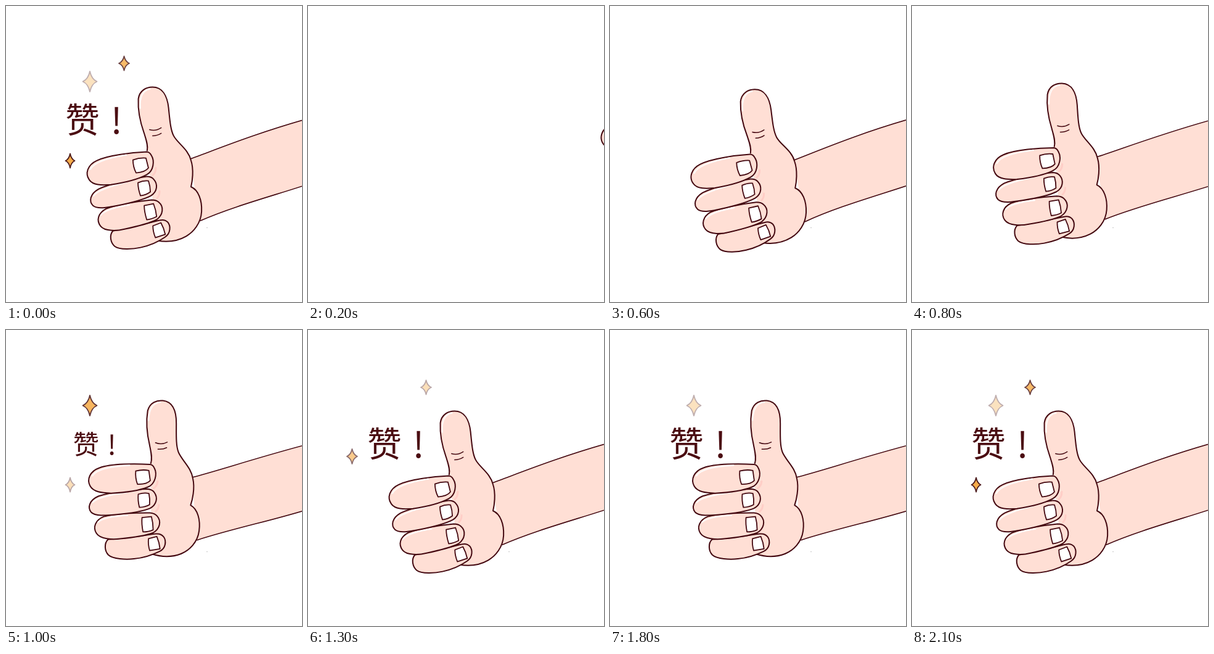
An HTML page for the animation above (2.2 s loop, 480 px wide and 480 px high).

```html
<!DOCTYPE html>
<html lang="zh">
<head>
<meta charset="utf-8">
<style>
  html, body { margin: 0; width: 100%; height: 100%; overflow: hidden; background: #fff; }
  svg { display: block; width: 100vw; height: 100vh; }
  text { font-family: "Noto Sans CJK SC", "Noto Sans CJK", "Noto Sans CJK JP", sans-serif; text-anchor: middle; fill: #4b0d12; }
  .skin { fill: #ffdfd5; stroke: #430810; stroke-width: 2; stroke-linejoin: round; stroke-linecap: round; }
  .arm { stroke-width: 1.6; }
  .nail { fill: #fff; stroke: #430810; stroke-width: 1.8; stroke-linejoin: round; }
  .crease { fill: none; stroke: #430810; stroke-width: 1.5; stroke-linecap: round; }
  .shine { fill: none; stroke: #fff; stroke-width: 2.4; stroke-linecap: round; opacity: .85; }
  .shade { fill: none; stroke: #ffc6c0; stroke-width: 3; stroke-linecap: round; opacity: .7; }
  .spark { fill: #f6ad4b; stroke: #4b1a1c; stroke-width: 1.8; stroke-linejoin: round; }
</style>
</head>
<body>
<svg id="stage" viewBox="0 0 480 480">
  <g id="hand"><circle cx="326" cy="359.5" r=".7" fill="#aaa"/></g>
  <g id="sparks"></g>
  <g id="praise">
    <text x="124" y="205.3" font-size="55.5">赞</text>
    <text x="179" y="207.3" font-size="58">!</text>
  </g>
</svg>
<script>
const LOOP = 2200, STEP = 100;
const PIVOT = { x: 403, y: 281 };
const hand = document.getElementById('hand');
const praise = document.getElementById('praise');
const sparkLayer = document.getElementById('sparks');

function addPath(parent, cls, d) {
  const el = document.createElementNS('http://www.w3.org/2000/svg', 'path');
  el.setAttribute('class', cls);
  el.setAttribute('d', d);
  parent.appendChild(el);
  return el;
}

// Outlines in the resting pose, back to front.
const parts = [
  ['skin arm', 'M298 248 C335 235 405 206 496 181 L496 287 C440 306 370 324 315 348'],
  ['skin', 'M229 234 C231 225 227 215 224 205 C217 185 214 168 215 150 C217 136 228 131 238 131 C254 131 262 145 264 165 C266 185 267 200 272 210 C278 222 296 232 300 250 C305 265 302 285 300 293 C312 298 318 315 317 333 C316 352 304 366 292 373 C278 381 262 383 245 380'],
  ['shine', 'M218 165 C217 148 222 136 234 134'],
  ['crease', 'M233 200 Q243 203 252 197 M238 210 Q246 210 252 206'],
  ['skin', 'M249 347 C235 350 200 360 173 364 C167 371 169 383 176 389 C184 395 205 394 218 391 C232 388 248 381 258 374 C267 368 267 356 262 350 C258 346 253 346 249 347 Z'],
  ['nail', 'M238 356 L251 351 Q256 360 258 370 L242 375 Q238 366 238 356 Z'],
  ['skin', 'M236 314 C215 316 180 321 162 328 C149 335 146 347 153 356 C160 365 180 364 192 361 C212 357 232 352 244 346 C255 338 256 325 248 318 C245 315 240 314 236 314 Z'],
  ['shine', 'M154 338 Q162 328 200 322'],
  ['nail', 'M224 323 L239 320 Q243 330 244 341 Q237 345 228 346 Q224 333 224 323 Z'],
  ['skin', 'M228 276 C205 279 168 288 150 296 C136 304 134 316 141 323 C148 329 165 326 180 323 C200 319 222 314 235 307 C246 300 246 288 240 281 C237 277 232 276 228 276 Z'],
  ['shine', 'M142 307 Q148 297 195 285'],
  ['nail', 'M214 286 Q223 282 231 283 Q234 292 234 301 Q227 306 218 307 Q214 296 214 286 Z'],
  ['skin', 'M228 236 C205 237 165 241 147 250 C132 257 128 271 135 281 C141 290 155 290 170 289 C190 286 215 280 228 273 C240 267 241 250 236 242 C234 238 231 236 228 236 Z'],
  ['shine', 'M137 264 Q144 249 195 241'],
  ['shade', 'M243 262 Q243 270 238 274 M249 300 Q249 307 245 311'],
  ['nail', 'M206 249 Q217 245 227 246 L231 262 Q226 269 211 270 Q206 260 206 249 Z']
].map(([cls, d]) => ({ d, el: addPath(hand, cls, d) }));

const sparks = [
  { x: 191.5, y: 93, w: 8.5, h: 11.5, span: 180, peaks: [1180, 2150] },
  { x: 136, y: 122.5, w: 11.5, h: 16.5, span: 215, peaks: [1050, 1950] },
  { x: 104, y: 251, w: 7.5, h: 11.5, span: 180, peaks: [1120, 2110] },
  { x: 71.5, y: 205, w: 8.5, h: 12, span: 180, peaks: [1380] }
];
for (const s of sparks) {
  const { x, y, w, h } = s, a = w * .25, b = h * .22;
  s.el = addPath(sparkLayer, 'spark',
    `M${x} ${y - h} Q${x + a} ${y - b} ${x + w} ${y} Q${x + a} ${y + b} ${x} ${y + h}` +
    ` Q${x - a} ${y + b} ${x - w} ${y} Q${x - a} ${y - b} ${x} ${y - h} Z`);
}

// The hand turns about a point in the forearm; the turn fades along the arm.
function bend(d, sway) {
  return d.replace(/([\d.]+) ([\d.]+)/g, (_, px, py) => {
    const x = px - PIVOT.x, y = py - PIVOT.y;
    const stiffness = Math.min(1, Math.max(.2, 1 - (px - 250) / 287));
    const angle = sway * stiffness * Math.PI / 30;
    const c = Math.cos(angle), s = Math.sin(angle);
    return `${(PIVOT.x + x * c - y * s).toFixed(2)} ${(PIVOT.y + x * s + y * c).toFixed(2)}`;
  });
}

function draw(ms) {
  // The first picture repeats the last one.
  const t = Math.floor(ms % LOOP / STEP) * STEP || LOOP - STEP;

  const left = Math.max(0, (600 - t) / 100);
  const slide = 102 * left - 4 * left * left;
  hand.setAttribute('transform', `translate(${slide} ${-slide * .186})`);

  const sway = .375 + .625 * Math.cos((Math.max(t, 600) - 1010) / 800 * 2 * Math.PI);
  for (const p of parts) p.el.setAttribute('d', bend(p.d, sway));

  const size = Math.min(1, .76 + (t - 1000) / 100 * .24);
  praise.setAttribute('visibility', t >= 900 ? 'visible' : 'hidden');
  praise.setAttribute('transform', `translate(148 186) scale(${Math.max(0, size)}) translate(-148 -186)`);

  for (const s of sparks) {
    const glow = Math.max(...s.peaks.map(peak => 1 - Math.abs(t - peak) / s.span));
    s.el.setAttribute('opacity', Math.min(1, Math.max(0, glow * 1.15)));
  }
}

const start = performance.now();
function tick() {
  draw(performance.now() - start);
  requestAnimationFrame(tick);
}
tick();
</script>
</body>
</html>
```
